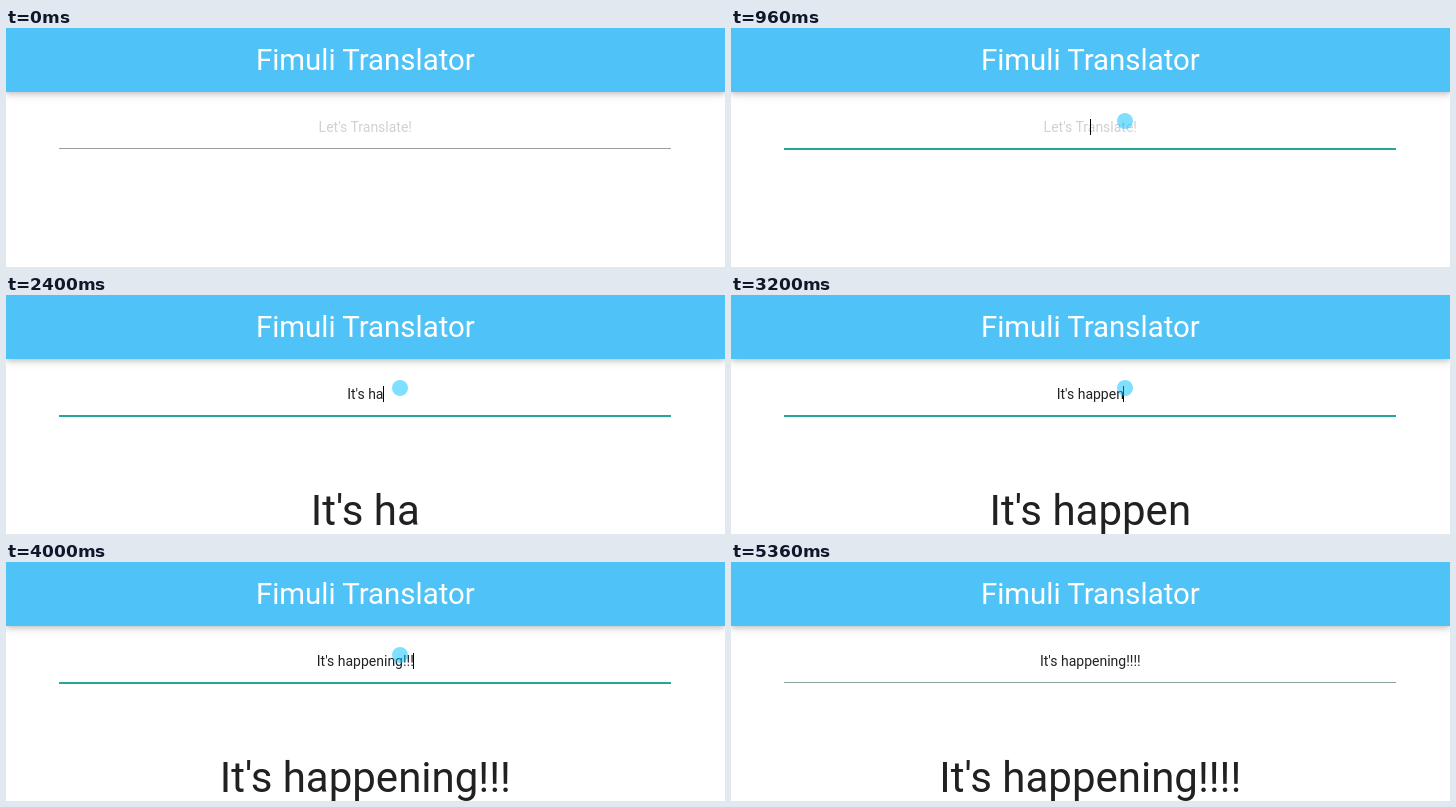
An HTML page that plays this animation: 719 by 239 pixels, repeating every 5.44 s.

```html
<!DOCTYPE html>
<html lang="en">
<head>
<meta charset="utf-8">
<title>Translator</title>
<style>
  html, body { margin: 0; width: 100%; height: 100%; overflow: hidden; background: #fff; }
  header {
    position: absolute; top: 0; left: 0; width: 100%; height: 64px; background: #4fc3f7;
    box-shadow: 0 2px 5px rgba(0, 0, 0, .16), 0 2px 10px rgba(0, 0, 0, .12);
  }
  svg { position: absolute; top: 0; left: 0; }
  text { font-family: Roboto, sans-serif; text-anchor: middle; white-space: pre; fill: #212121; }
</style>
</head>
<body>
<header></header>
<svg width="719" height="239">
  <text x="359.3" y="42" font-size="29.4" style="fill: #fff">Fimuli Translator</text>
  <text id="input" x="359.3" y="104" font-size="14"></text>
  <text id="output" x="359.3" y="230" font-size="42"></text>
  <rect id="line" x="53" y="120" width="612" height="1"/>
  <rect id="glow" x="53" y="121" width="612" height="1" fill="#26a69a"/>
  <rect id="caret" y="91" width="1" height="16"/>
  <circle id="pointer" r="8" fill="#00bfff"/>
</svg>
<script>
const LOOP = 5440, STEP = 80;
const PHRASE = "It's happening!!!!";
// Time at which each character of the phrase is typed
const KEYS = [1520, 1680, 1840, 2000, 2240, 2320, 2400, 2480, 2560, 2720,
              3200, 3360, 3440, 3520, 3760, 3920, 4000, 4160];
// Pointer path: time, x, y
const PATH = [[240, 487, 31], [560, 397, 94], [640, 389, 103], [720, 392, 97], [800, 394, 93]];
const GREY = [158, 158, 158], TEAL = [38, 166, 154];

const [input, output, line, glow, caret, pointer] =
  ["input", "output", "line", "glow", "caret", "pointer"].map(id => document.getElementById(id));

const set = (el, attrs) => {
  for (const name in attrs) el.setAttribute(name, attrs[name]);
};
const ramp = (t, from, to) => Math.min(1, Math.max(0, (t - from) / (to - from)));
const mix = (a, b, k) => a + (b - a) * k;

function pointerAt(t) {
  let i = 0;
  while (i < PATH.length - 2 && t > PATH[i + 1][0]) i++;
  const [t0, x0, y0] = PATH[i], [t1, x1, y1] = PATH[i + 1];
  const k = ramp(t, t0, t1);
  const eased = i ? k : k * k * (3 - 2 * k);
  return { cx: mix(x0, x1, eased), cy: mix(y0, y1, eased) };
}

function draw(t) {
  const typed = PHRASE.slice(0, KEYS.filter(key => key <= t).length);
  input.textContent = typed || "Let's Translate!";
  input.style.fill = typed ? "#212121" : "#d1d1d1";
  output.textContent = typed.trim();

  const focus = t < 5200 ? ramp(t, 720, 960) : 1 - ramp(t, 5200, 5400);
  set(line, { fill: `rgb(${GREY.map((c, i) => mix(c, TEAL[i], focus))})` });
  set(glow, { opacity: t < 5360 ? focus : 0 });

  const width = typed ? input.getComputedTextLength() : 0;
  const caretOn = t >= 800 && t < 4640 || t >= 5120 && t < 5280;
  set(caret, { x: Math.floor(359.3 + width / 2), opacity: +caretOn });

  set(pointer, { ...pointerAt(t), opacity: t < 240 ? 0 : 0.5 * (1 - ramp(t, 4480, 4640)) });
}

const start = performance.now();
function tick() {
  const t = (performance.now() - start) % LOOP;
  draw(Math.floor(t / STEP) * STEP);
  requestAnimationFrame(tick);
}
tick();
</script>
</body>
</html>
```
